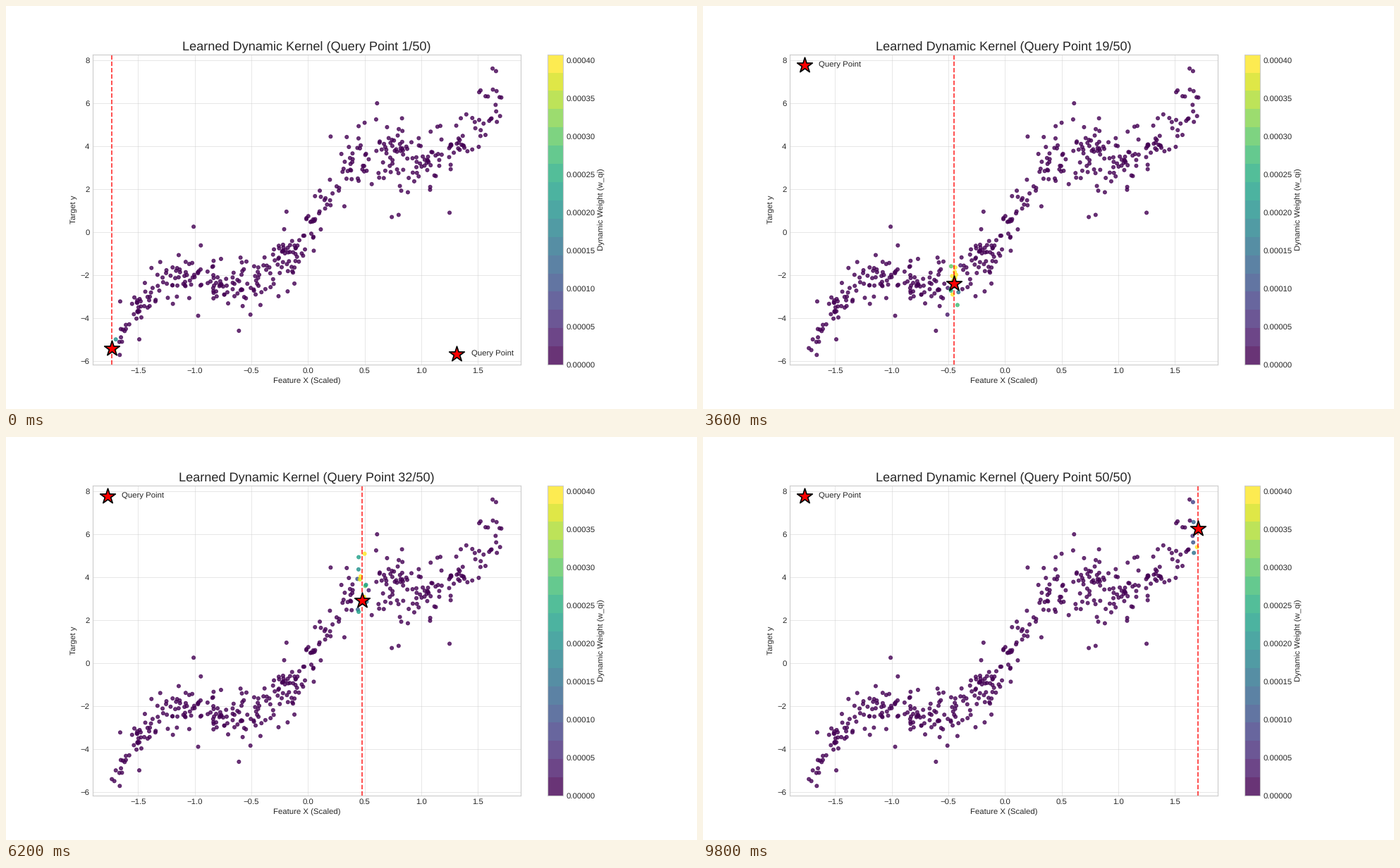
Recreate the animation shown at these times as a matplotlib script. Size 980 by 572 pixels, loop 10 s.

```python
import numpy as np
import matplotlib.pyplot as plt
from matplotlib.animation import FuncAnimation

W, H, DPI = 980, 572, 64
K = 245 / 3 / DPI          # point sizes are given for 245/3 dpi
QUERIES, POINTS = 50, 430
VMAX = 0.0004073
SIGMA = 0.0243             # kernel width along x

plt.rcParams.update({
    "font.family": "Liberation Sans", "font.size": 10 * K, "text.hinting": "none",
    "axes.titlesize": 16 * K, "axes.titlepad": 6 * K, "axes.labelpad": 4 * K,
    "axes.linewidth": K, "axes.edgecolor": "0.8", "axes.labelcolor": "0.15",
    "axes.axisbelow": True, "text.color": "0.15",
    "xtick.color": "0.15", "ytick.color": "0.15",
    "xtick.major.size": 0, "ytick.major.size": 0,
    "xtick.major.pad": 3.5 * K, "ytick.major.pad": 3.5 * K,
    "lines.linewidth": 1.5 * K, "legend.frameon": False,
})

# Key stops of the query: number, x, y
stops = np.array([
    (1, -1.732, -5.41), (7, -1.284, -2.12), (14, -0.811, -2.37), (24, -0.093, -0.63),
    (32, 0.480, 2.92), (39, 0.923, 3.44), (50, 1.707, 6.27),
])

# Points far off the trend
outliers = np.array([
    (-1.71, -5.5), (-1.49, -5.0), (-1.01, 0.25), (-0.97, -3.9), (-0.61, -4.6),
    (-0.42, -3.4), (-0.19, 0.95), (-0.12, -2.4), (0.20, 4.45), (0.61, 6.0),
    (0.74, 0.7), (0.80, 0.8), (0.83, 5.3), (1.25, 0.9), (1.63, 7.62), (1.66, 7.5),
])


def trend(x):
    """Rising wave, lifted on both sides of zero."""
    return 3.35 * x + 1.25 * np.sin(3.7 * x) + 0.65 * (1 - np.exp(-12 * x**2))


def weights(x0):
    return 1.34 * VMAX * np.exp(-0.5 * ((x - x0) / SIGMA) ** 2)


rng = np.random.default_rng(8)
fixed = np.vstack([stops[:, 1:], outliers])
cloud_x = rng.uniform(-1.71, 1.7, POINTS - len(fixed))
noise = np.clip(0.53 * rng.standard_t(6, cloud_x.size), -1.6, 1.6)
x = np.append(fixed[:, 0], cloud_x)
y = np.append(fixed[:, 1], trend(cloud_x) + noise)

# Each query sits on the data point nearest to its place along x
path = np.interp(np.arange(1, QUERIES + 1), stops[:, 0], stops[:, 1])
query = np.abs(x - path[:, None]).argmin(axis=1)

fig, ax = plt.subplots(figsize=(W / DPI, H / DPI), dpi=DPI)
ax.set(xlim=(-1.904, 1.879), ylim=(-6.18, 8.28),
       xlabel="Feature X (Scaled)", ylabel="Target y")
ax.set_xticks(np.arange(-1.5, 1.6, 0.5))
ax.set_yticks(np.arange(-6, 9, 2))
ax.grid(color="0.8", alpha=0.5, linewidth=0.8 * K)

dots = ax.scatter(x, y, c=weights(x[query[0]]), cmap=plt.get_cmap("viridis", 17),
                  vmin=0, vmax=VMAX, s=20 * K**2, alpha=0.8)
bar = fig.colorbar(dots, ax=ax, ticks=np.arange(9) * 5e-5, format="%.5f")
bar.set_label("Dynamic Weight (w_qi)")
line = ax.axvline(x[query[0]], color="red", linestyle="--", alpha=0.8)
star = ax.scatter([x[query[0]]], [y[query[0]]], s=400 * K**2, c="red", marker="*",
                  edgecolors="black", linewidths=1.5 * K, zorder=5, label="Query Point")
legend = ax.legend(loc="lower right")


def update(i):
    q = query[i]
    dots.set_array(weights(x[q]))
    line.set_xdata([x[q], x[q]])
    star.set_offsets([(x[q], y[q])])
    # the legend stays clear of the line
    legend.set_loc("lower right" if x[q] < -1.25 else "upper left")
    ax.set_title(f"Learned Dynamic Kernel (Query Point {i + 1}/{QUERIES})")
    return dots, line, star, legend


anim = FuncAnimation(fig, update, frames=QUERIES, interval=200, repeat=True, repeat_delay=0)
plt.show()
```
